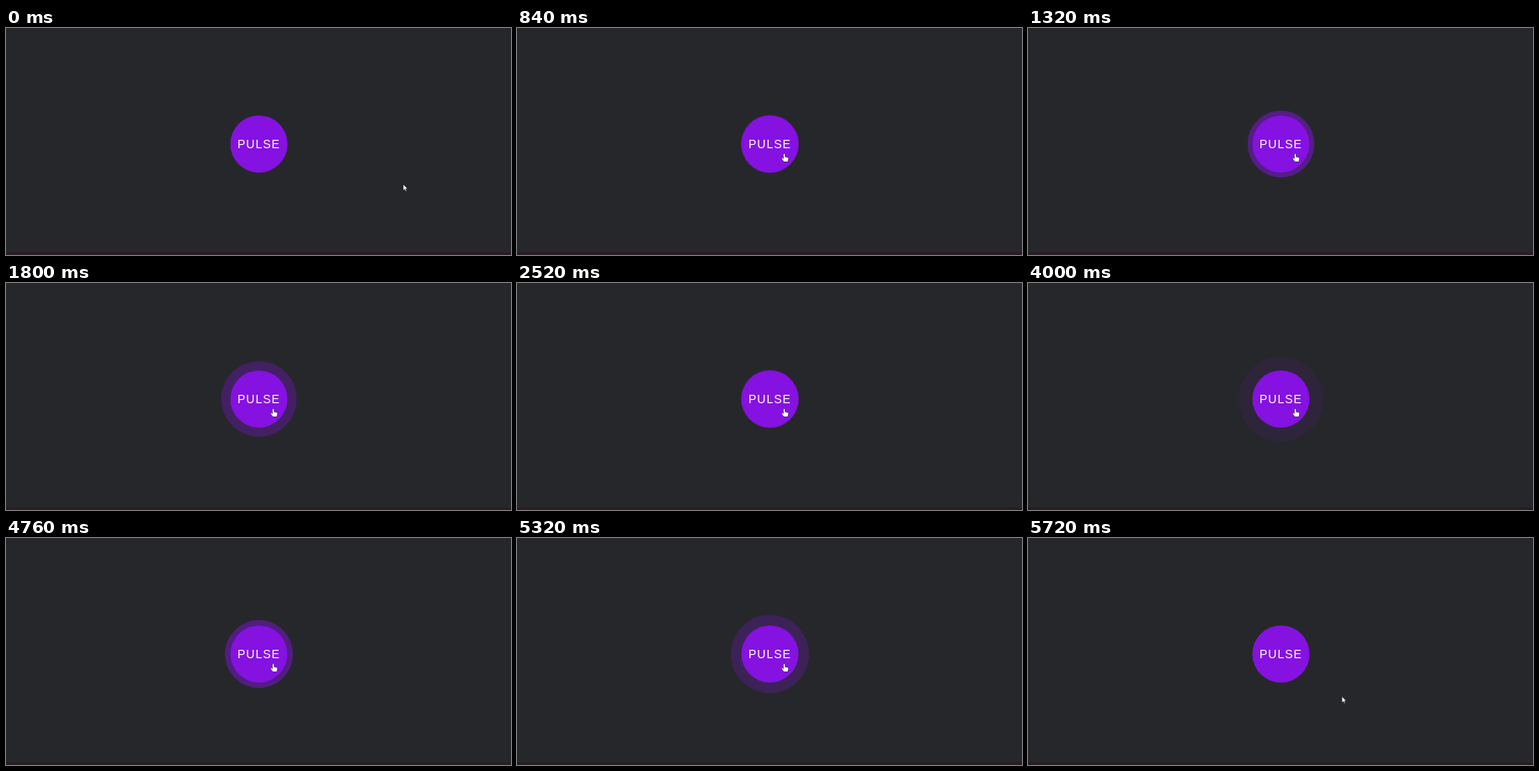
An HTML page that plays this animation: 600 by 270 pixels, repeating every 6120 ms.

```html
<!DOCTYPE html>
<html lang="en">
<head>
<meta charset="utf-8">
<title>Pulse button</title>
<style>
  html, body { margin: 0; width: 100%; height: 100%; overflow: hidden; background: #26272b; }
  svg { display: block; width: 600px; height: 270px; }
  text { font: 14px "Liberation Sans", Arial, sans-serif; letter-spacing: 1px; fill: #fff; }
</style>
</head>
<body>
<svg viewBox="0 0 600 270">
  <rect width="600" height="270" fill="#26272b"/>
  <rect y="267" width="600" height="3" fill="#2a1c22"/>
  <circle id="ring" cx="300.5" cy="138" fill="none" stroke="#8512e0"/>
  <circle cx="300.5" cy="138" r="34" fill="#8512e0"/>
  <text x="275" y="143">PULSE</text>
  <path id="arrow" d="M0 0V7.2L1.7 5.7L2.8 8.3L4 7.8L2.9 5.3H5.1Z"
        fill="#fff" stroke="#1b1b1f" stroke-width=".5"/>
  <path id="hand" d="M-1 .6Q0 -.7 1 .6V3.7L4.2 4.4Q5.2 4.8 5 6L4.4 9.6H-.5L-3 6.2Q-3.2 4.8 -1.9 5.1L-1 5.9Z"
        fill="#fff" stroke="#1b1b1f" stroke-width=".5"/>
</svg>
<script>
const LOOP = 6120, STEP = 40, LAST = 5720;
const CX = 300.5, CY = 138, R = 34;
const HOVER_ON = 790, PERIOD = 1685, SPREAD = 18;

// Pointer stops: time, x, y
const path = [
  [60, 472, 186],
  [480, 280, 137],
  [640, 339, 155],
  [800, 317.5, 149.5],
  [5440, 317.5, 149.5],
  [5720, 373, 188.5]
];

const el = id => document.getElementById(id);
const ring = el("ring"), arrow = el("arrow"), hand = el("hand");
const ease = p => p * p * (3 - 2 * p);

function pointer(t) {
  if (t <= path[0][0]) return path[0].slice(1);
  for (let i = 1; i < path.length; i++) {
    const [t0, x0, y0] = path[i - 1], [t1, x1, y1] = path[i];
    if (t <= t1) {
      const p = ease((t - t0) / (t1 - t0));
      return [x0 + (x1 - x0) * p, y0 + (y1 - y0) * p];
    }
  }
  return path[path.length - 1].slice(1);
}

function draw(t) {
  const [x, y] = pointer(t);
  const over = Math.hypot(x - CX, y - CY) < R;
  const place = `translate(${x} ${y})`;
  arrow.setAttribute("transform", place);
  hand.setAttribute("transform", place);
  arrow.setAttribute("visibility", over ? "hidden" : "visible");
  hand.setAttribute("visibility", over ? "visible" : "hidden");

  const pulsing = over && t >= HOVER_ON;
  const p = pulsing ? (t - HOVER_ON) % PERIOD / PERIOD : 0;
  const w = p * SPREAD;
  ring.setAttribute("r", R + w / 2);
  ring.setAttribute("stroke-width", w);
  ring.setAttribute("stroke-opacity", pulsing ? 0.7 * (1 - p) ** 0.9 : 0);
}

const start = performance.now();
function tick(now) {
  const t = Math.max(0, now - start) % LOOP;
  draw(Math.min(LAST, Math.floor(t / STEP) * STEP));
  requestAnimationFrame(tick);
}
draw(0);
requestAnimationFrame(tick);
</script>
</body>
</html>
```
